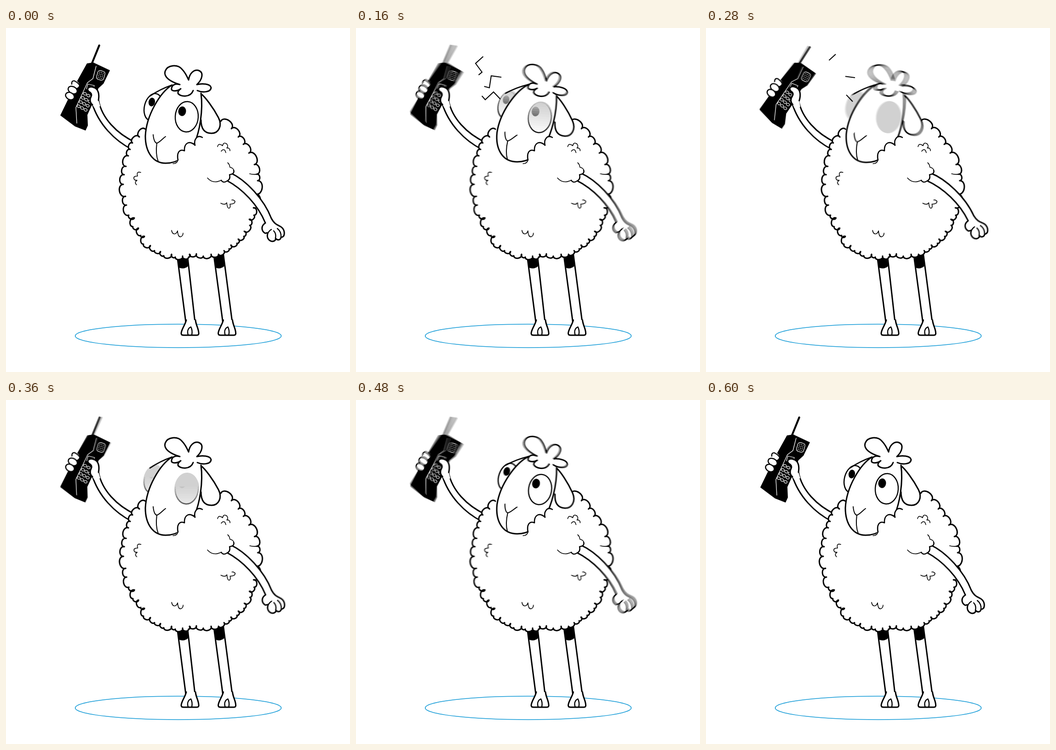
An HTML page with a canvas that plays this animation: 748x748 px, repeating every 1.44 s.

```html
<!DOCTYPE html>
<html lang="en">
<head>
<meta charset="utf-8">
<title>Sheep with a ringing phone</title>
<style>
html, body { margin: 0; width: 100%; height: 100%; overflow: hidden; background: #fff; }
canvas { display: block; width: 100vw; height: 100vh; }
</style>
</head>
<body>
<canvas id="stage" width="748" height="748"></canvas>
<script>
const SIZE = 748, LOOP = 1440, STEP = 40, LAST = 15, SAMPLES = 14, PEN = 3;
const out = document.getElementById('stage').getContext('2d');
const layer = document.createElement('canvas');
layer.width = layer.height = SIZE;
const c = layer.getContext('2d');

// Valleys between the wool bumps, from the left shoulder round to the right one
const WOOL = [
  [303, 220], [290, 237], [275, 250], [270, 264], [266, 278], [261, 301], [257, 319],
  [255, 340], [260, 366], [262, 385], [267, 407], [279, 413], [276, 432], [288, 435],
  [293, 451], [301, 453], [299, 470], [314, 473], [323, 484], [336, 486], [343, 495],
  [360, 492], [368, 498], [384, 496], [397, 498], [399, 492], [414, 491], [429, 496],
  [446, 492], [462, 492], [474, 484], [485, 480], [489, 472], [502, 468], [505, 459],
  [517, 453], [518, 442], [530, 429], [529, 416], [539, 407], [538, 391], [543, 361],
  [547, 332], [545, 318], [540, 297], [528, 272], [516, 253], [505, 237], [490, 219], [467, 203]
];

const ZIGZAGS = [
  [[252, 114], [274, 96], [260, 77], [282, 57]],
  [[259, 122], [290, 130], [294, 104], [324, 108]],
  [[261, 133], [281, 156], [299, 139], [319, 160]]
];

const CURLS = [
  [350, 'M293 314Q283 311 286 322Q277 322 278 327Q279 332 285 331Q278 336 284 341'],
  [385, 'M467 381Q476 386 480 380Q481 392 485 392Q489 390 487 383Q498 383 498 377Q495 373 491 374'],
  [448, 'M360 440Q362 450 369 447Q372 445 373 441Q374 455 380 454Q385 452 385 446'],
  [235, 'M460 258Q462 249 471 256Q473 247 480 252Q484 257 480 261Q487 260 487 267M468 268Q472 262 476 266L478 271']
];

const HAIR = 'M378 119C358 117 342 107 346 94C351 80 373 78 383 90C390 97 394 106 397 113' +
  'C399 99 408 90 418 92C431 96 427 112 415 123C426 120 445 121 446 130C445 140 427 141 416 136' +
  'C411 137 409 138 405 141C395 150 378 150 374 142C373 138 376 135 380 132' +
  'C373 138 358 139 360 131C361 125 369 120 378 119Z';
const HAIR_LINE = 'M416 136C427 141 445 140 446 130C445 121 426 120 415 123C427 112 431 96 418 92' +
  'C408 90 399 99 397 113C394 106 390 97 383 90C373 78 351 80 346 94C342 107 358 117 378 123' +
  'C366 120 361 125 360 131C358 139 373 138 380 132C376 135 373 138 374 142C378 150 401 152 407 136';
const COLLAR = 'M374 287C371 273 376 262 388 267C387 251 398 243 411 255C408 244 415 231 427 238';

const clamp = x => Math.max(0, Math.min(1, x));
const ramp = (x, a, b) => clamp((x - a) / (b - a));
const ease = x => (1 - Math.cos(Math.PI * x)) / 2;

function line(d, width = PEN, color = '#000') {
  c.lineWidth = width;
  c.strokeStyle = color;
  c.stroke(new Path2D(d));
}

function fill(d, color = '#fff') {
  c.fillStyle = color;
  c.fill(new Path2D(d));
}

function shape(d, width) {
  fill(d);
  line(d, width);
}

function oval(x, y, rx, ry, turn, color, width = 0) {
  c.beginPath();
  c.ellipse(x, y, rx, ry, turn, 0, 7);
  c.fillStyle = color;
  c.fill();
  if (width) {
    c.lineWidth = width;
    c.strokeStyle = '#000';
    c.stroke();
  }
}

function turned(x, y, angle, draw) {
  c.save();
  c.translate(x, y);
  c.rotate(angle);
  c.translate(-x, -y);
  draw();
  c.restore();
}

// Motion, in steps of 40 ms
function shake(f) {
  return ease(2 * clamp((f - 0.8) / 12) * 3);
}

function nod(f) {
  if (f < 5) return ease(ramp(f, 1.5, 4.6));
  if (f < 9) return 1 - ease(ramp(f, 5.8, 8.3));
  if (f < 12.6) return ease(ramp(f, 9.3, 12.6));
  return 1 - ease(ramp(f, 12.6, 14.3));
}

const lid = f => ramp(f, 3.5, 4.5) - ramp(f, 8.9, 9.9);
const sway = (y, v) => 5 * v * Math.sin(Math.PI * ramp(y, 215, 490));

function leg(x1, y1, x2, x3, x4) {
  shape(`M${x1} ${y1}L${x3} 640L${x4} 640L${x2} ${y1}`);
  const at = (a, b, y) => a + (b - a) * (y - y1) / (640 - y1);
  fill(`M${x1} ${y1}L${at(x1, x3, 521)} 521Q${(x1 + x2) / 2 + 5} 526 ${at(x2, x4, 517)} 517L${x2} ${y1}Z`, '#000');
  c.save();
  c.translate(x3 - 391, 0);
  shape('M392 635C390 645 381 656 381 664Q381 668 386 668L415 668Q420 668 419 662C418 652 413 646 412 635');
  line('M396 667C393 658 397 652 402 650Q406 658 404 667', 2.4);
  c.restore();
}

function wool(v) {
  const pts = WOOL.map(([x, y]) => [x + sway(y, v), y]);
  c.beginPath();
  c.moveTo(...pts[0]);
  for (let i = 1; i < pts.length; i++) {
    const [ax, ay] = pts[i - 1], [bx, by] = pts[i];
    const dx = bx - ax, dy = by - ay;
    c.bezierCurveTo(ax - dy * 0.55 - dx * 0.08, ay + dx * 0.55 - dy * 0.08,
      bx - dy * 0.55 + dx * 0.08, by + dx * 0.55 + dy * 0.08, bx, by);
  }
  c.fillStyle = '#fff';
  c.fill();
  c.lineWidth = PEN;
  c.strokeStyle = '#000';
  c.stroke();
  for (const [y, d] of CURLS) {
    c.save();
    c.translate(sway(y, v), 0);
    line(d, 1.6);
    c.restore();
  }
  c.save();
  c.translate(sway(318, v), 0);
  line('M530 317Q537 319 545 318', 1.8);
  c.restore();
}

function phone() {
  fill('M201 36.5Q204 34.5 205 38L189 77L185 76Z', '#000');
  fill('M176 77L190 75L226 92L212 121L201 131L188 165L177 189L178 212L173 223L150 214L118 190L151 122Z', '#000');
  line('M196 83L189 110L177 119L152 173L154 207', 1.3, '#fff');
  turned(206, 103, 0.28, () => {
    c.lineWidth = 1.2;
    c.strokeStyle = '#fff';
    c.beginPath();
    c.roundRect(198, 93, 16, 20, 5);
    c.stroke();
    for (let i = 0; i < 12; i++) {
      oval(202 + i % 3 * 4, 97 + Math.floor(i / 3) * 4, 0.9, 0.9, 0, '#fff');
    }
  });
  line('M178 122L192 125L189 134L175 132Z', 1.2, '#fff');
  c.lineWidth = 1.2;
  c.strokeStyle = '#fff';
  for (let r = 0; r < 4; r++) {
    for (let k = 0; k < 3; k++) {
      c.beginPath();
      c.ellipse(158 + r * 4.5 + k * 7.5, 170 - r * 9 + k * 4, 3.6, 2.7, 0.3, 0, 7);
      c.stroke();
    }
  }
}

function fingers() {
  fill('M146 114Q158 114 160 124Q158 134 148 131Z');
  line('M143 122Q142 114 149 115Q160 121 160 126Q157 133 150 132', 2.4);
  oval(145, 135, 10.5, 7.5, 0.5, '#fff', 2.4);
  oval(139, 148, 10, 7.5, 0.5, '#fff', 2.4);
}

function raisedArm(angle) {
  const top = 'M201 156C208 196 241 230 282 249';
  fill(top + 'L276 266C236 245 201 209 187 163Z');
  line(top + 'M187 163C201 209 236 245 274 264');
  turned(193, 172, angle, phone);
  turned(193, 172, angle * 0.7, () => {
    fingers();
    const thumb = 'M188 167C183 163 181 156 185 149C188 143 184 140 180 138C174 132 180 126 190 129C202 132 203 146 201 157';
    fill(thumb + 'L205 170L193 175Z');
    line(thumb);
  });
}

function loweredArm(angle) {
  turned(488, 322, angle, () => {
    const top = 'M488 315C522 331 561 372 577 414';
    fill(top + 'L564 426C548 385 515 350 479 331Z');
    line(top + 'M479 331C515 350 548 385 564 424');
    shape('M564 424C554 430 555 441 563 446C567 447 569 443 569 447C566 456 572 464 580 464' +
      'C586 463 587 459 586 457C590 463 597 461 598 455C607 455 607 442 601 435C595 428 586 431 577 414');
    line('M569 447Q572 441 577 438M586 457Q588 447 582 441M598 455Q599 443 590 436', 2.4);
  });
  fill('M450 300L482 293Q485 303 493 306Q499 316 486 319Q489 329 480 333Q472 338 468 331L450 330Z');
  line('M438 326Q450 340 468 331', 1.6);
  line('M468 331Q472 338 480 333Q489 329 486 319Q498 317 495 309', 2.4);
  line('M495 309Q494 304 487 303Q486 296 482 293', 1.6);
}

function shut(x, y, rx, ry, turn, amount) {
  if (amount <= 0) return;
  c.save();
  c.beginPath();
  c.rect(x - 50, y - ry - 3, 100, (2 * ry + 6) * amount);
  c.clip();
  oval(x, y, rx + 2, ry + 2, turn, '#d1d1d1');
  c.restore();
}

function head(f) {
  const n = nod(f), closed = lid(f);
  turned(380, 268, 0.108 * n, () => {
    turned(425, 145, -0.045 * n, () =>
      shape('M424 143C433 150 450 172 462 195C471 213 462 229 447 229C431 229 424 219 424 200'));
    oval(320, 172, 19, 30, 0.25, '#fff', 2.6);
    oval(317, 161, 7, 9.5, 0.2, '#000');
    shut(320, 172, 19, 30, 0.25, closed);
    line('M361 124Q335 133 313 148', 2.6);
    shape('M361 124C335 140 305 190 303 235C303 270 320 294 347 294' +
      'C375 294 400 275 410 250C421 225 429 180 424 142');
    oval(393, 193, 25, 33, 0.06, '#fff', 2.4);
    oval(383, 181, 8.5, 10.5, 0.1, '#000');
    shut(393, 193, 25, 33, 0.06, closed);
    line('M320 232C321 244 325 252 329 250C335 248 341 240 347 236M328 250C326 265 327 280 331 290', 2);
    turned(405, 140, 0.07 * n, () => {
      fill(HAIR);
      line(HAIR_LINE);
    });
  });
}

function scene(f) {
  const v = shake(f);
  c.fillStyle = '#fff';
  c.fillRect(0, 0, SIZE, SIZE);
  c.lineCap = c.lineJoin = 'round';
  c.lineWidth = 1.5;
  c.strokeStyle = '#159bd7';
  c.beginPath();
  c.ellipse(374.5, 669.5, 224, 25.5, 0, 0, 7);
  c.stroke();
  leg(371.5, 490, 394, 391, 411);
  leg(450, 480, 471, 471.5, 492);
  raisedArm(0.18 * v);
  wool(v);
  loweredArm(-0.065 * v);
  head(f);
  fill(COLLAR + 'L432 246L432 302L378 302L366 295Z');
  line(COLLAR, 2.6);
  line('M363 295Q372 295 374 287', 1.6);
}

// The part of a polyline between two fractions of its length
function trim(pts, from, to) {
  const lens = pts.slice(1).map((p, i) => Math.hypot(p[0] - pts[i][0], p[1] - pts[i][1]));
  const total = lens.reduce((a, b) => a + b);
  let pos = 0;
  out.beginPath();
  lens.forEach((len, i) => {
    const a = clamp((from * total - pos) / len), b = clamp((to * total - pos) / len);
    const at = k => pts[i].map((p, j) => p + (pts[i + 1][j] - p) * k);
    if (b > a) {
      if (a > 0 || i === 0) out.moveTo(...at(a));
      else out.lineTo(...at(0));
      out.lineTo(...at(b));
    }
    pos += len;
  });
  out.stroke();
}

function rays(f) {
  const from = 0.23 * ramp(f, 2, 4) + 0.53 * ramp(f, 4, 7) + 0.24 * ramp(f, 7, 9);
  const to = 0.41 * ramp(f, 1, 2) + 0.5 * ramp(f, 2, 4) + 0.09 * ramp(f, 4, 5);
  if (to <= from) return;
  out.lineWidth = 2.1;
  out.strokeStyle = '#000';
  out.lineJoin = 'miter';
  for (const z of ZIGZAGS) trim(z, from, to);
}

// Each picture is the average of several moments, which gives the motion blur
function render(f) {
  const count = f > 0 && f < LAST ? SAMPLES : 1;
  for (let i = 0; i < count; i++) {
    scene(count > 1 ? f - 0.5 + (i + 0.5) / count : f);
    out.globalAlpha = 1 / (i + 1);
    out.drawImage(layer, 0, 0);
  }
  out.globalAlpha = 1;
  rays(f);
}

const start = performance.now();
let shown = -1;

function tick() {
  const t = (performance.now() - start) % LOOP;
  const f = Math.min(LAST, Math.floor(t / STEP));
  if (f !== shown) {
    shown = f;
    render(f);
  }
  requestAnimationFrame(tick);
}
tick();
</script>
</body>
</html>
```
